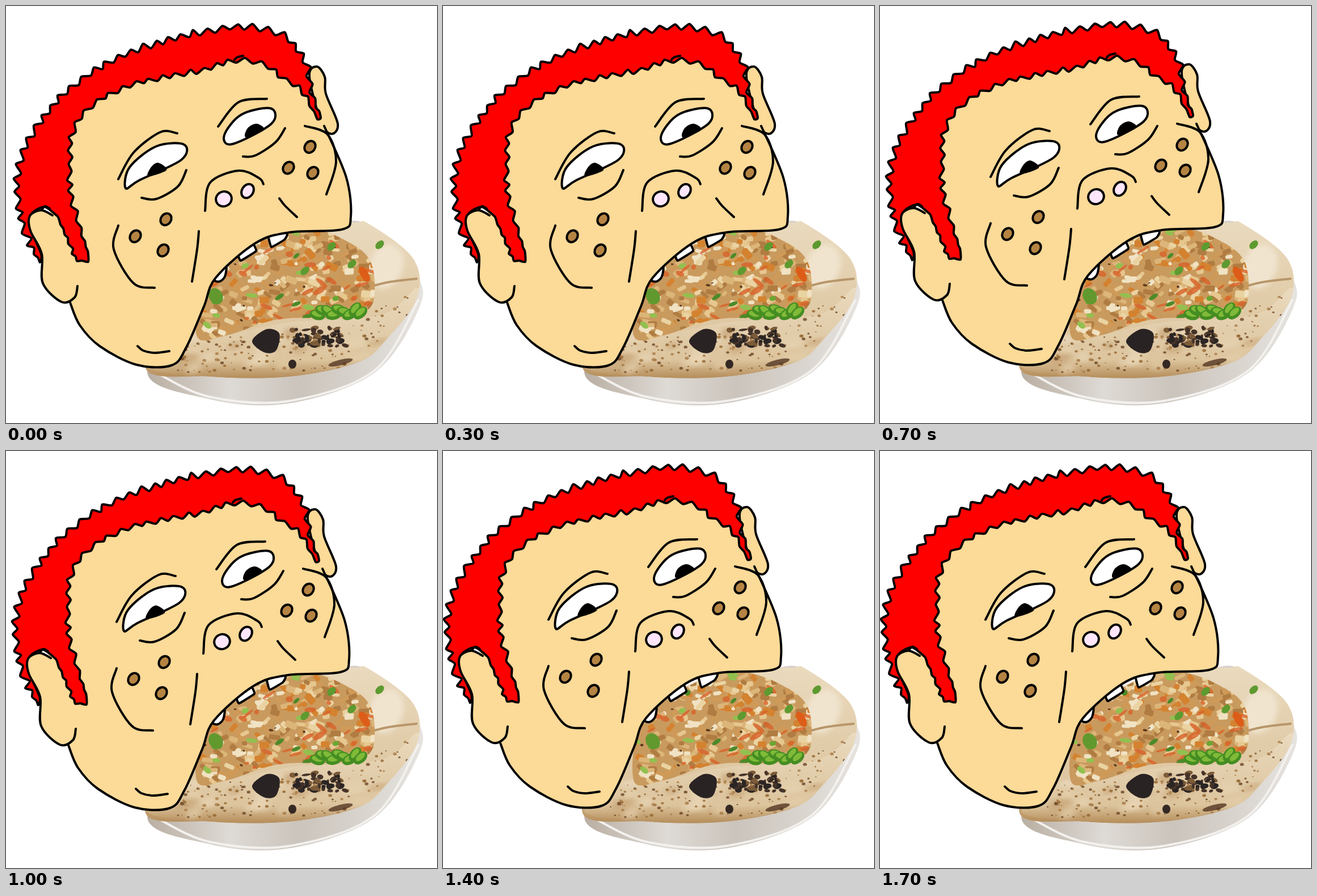
Animation, 760 px wide and 737 px high, one loop 1900 ms. Source, as an HTML page:

```html
<!DOCTYPE html>
<html lang="en">
<head>
<meta charset="utf-8">
<title>Pizza bite</title>
<style>
  html, body { margin: 0; width: 100%; height: 100%; overflow: hidden; background: #fff; }
  svg { display: block; width: 100%; height: 100%; }
</style>
</head>
<body>
<svg id="stage" viewBox="0 0 760 737" stroke-linecap="round" stroke-linejoin="round">
  <defs>
    <linearGradient id="metal">
      <stop offset="0" stop-color="#b9aea2"/>
      <stop offset=".3" stop-color="#dedad5"/>
      <stop offset=".55" stop-color="#cbc4bc"/>
      <stop offset="1" stop-color="#e6e3df"/>
    </linearGradient>
    <linearGradient id="dough" x1="0" y1="0" x2="0" y2="1">
      <stop offset="0" stop-color="#eadabe"/>
      <stop offset=".8" stop-color="#dcc49d"/>
      <stop offset="1" stop-color="#b58d5a"/>
    </linearGradient>
    <filter id="soft" x="-30%" y="-30%" width="160%" height="160%"><feGaussianBlur stdDeviation="5"/></filter>
    <clipPath id="inTop"></clipPath>
    <clipPath id="inCrust"></clipPath>
  </defs>
  <g id="pizza"></g>
  <g id="head"></g>
</svg>
<script>
const SVG = 'http://www.w3.org/2000/svg';
const get = id => document.getElementById(id);
const pizza = get('pizza'), head = get('head');
const INK = { stroke: '#000', 'stroke-width': 4 };
const SKIN = '#fcda98';

function add(parent, tag, attrs) {
  const el = document.createElementNS(SVG, tag);
  for (const key in attrs) el.setAttribute(key, attrs[key]);
  return parent.appendChild(el);
}

let seed = 41;
const rand = (lo = 0, hi = 1) => {
  seed = (seed * 16807) % 2147483647;
  return lo + (hi - lo) * seed / 2147483647;
};
const pick = list => list[Math.floor(rand(0, list.length))];
const repeat = (n, draw) => { for (let i = 0; i < n; i++) draw(i); };

// Smooth path through "x,y x,y ..." points; a lower bend keeps corners sharper.
function spline(text, closed = false, bend = 1 / 6) {
  const p = text.trim().split(/\s+/).map(s => s.split(',').map(Number)), n = p.length;
  const at = i => closed ? p[(i + n) % n] : p[Math.max(0, Math.min(n - 1, i))];
  let d = 'M' + p[0];
  for (let i = 0; i < (closed ? n : n - 1); i++) {
    const [a, b, c, e] = [at(i - 1), at(i), at(i + 1), at(i + 2)];
    const c1 = b.map((v, k) => (v + (c[k] - a[k]) * bend).toFixed(1));
    const c2 = c.map((v, k) => (v - (e[k] - b[k]) * bend).toFixed(1));
    d += `C${c1} ${c2} ${c}`;
  }
  return d + (closed ? 'Z' : '');
}

// Points that zigzag around a smooth guide, calming down near its ends.
function ruffle(guide, step, depth) {
  const path = document.createElementNS(SVG, 'path');
  path.setAttribute('d', spline(guide));
  const len = path.getTotalLength(), out = [];
  let side = 1;
  for (let s = 0; s < len; s += step * rand(.7, 1.3), side = -side) {
    const a = path.getPointAtLength(s), b = path.getPointAtLength(s + 1);
    const off = side * depth * rand(.6, 1.2) * Math.min(1, s / 40, (len - s) / 80);
    const run = Math.hypot(b.x - a.x, b.y - a.y) || 1;
    out.push(`${(a.x + (b.y - a.y) / run * off).toFixed(1)},${(a.y - (b.x - a.x) / run * off).toFixed(1)}`);
  }
  return out.join(' ');
}

const fill = (parent, pts, color, more) =>
  add(parent, 'path', { d: spline(pts, true), fill: color, ...more });
const line = (pts, paint = 'none') =>
  add(head, 'path', { d: spline(pts), fill: paint, ...INK });
const inked = (pts, color, bend) =>
  add(head, 'path', { d: spline(pts, true, bend), fill: color, ...INK });
const oval = (parent, x, y, rx, ry, turn, color, more) =>
  add(parent, 'ellipse', { rx, ry, fill: color, transform: `translate(${x} ${y}) rotate(${turn})`, ...more });

function drawPizza() {
  const blur = { filter: 'url(#soft)' };
  const crust = '245,635 350,470 500,386 612,383 640,385 718,446 725,515 672,588 620,630 500,655 360,655';
  const topping = '336,582 360,470 500,390 622,428 650,490 625,545 480,554 390,582';
  const lip = '250,638 320,585 390,581 500,559 660,546 725,498 724,535 660,608 620,630 500,655 360,655';
  add(get('inTop'), 'path', { d: spline(topping, true) });
  add(get('inCrust'), 'path', { d: spline(crust, true) });

  fill(pizza, '250,640 420,480 588,385 655,400 724,475 728,535 650,648 500,702 360,695', 'url(#metal)');
  line('268,650 360,691 500,698 650,644 727,520').setAttribute('stroke', '#f3f1ee');
  pizza.append(head.lastChild);

  const base = add(pizza, 'g', { 'clip-path': 'url(#inCrust)' });
  fill(base, crust, 'url(#dough)');
  oval(base, 670, 460, 30, 40, 20, '#f0e4cf', blur);

  const food = add(pizza, 'g', { 'clip-path': 'url(#inTop)' });
  fill(food, topping, '#c99a5e');
  const spot = draw => draw(food, rand(340, 645), rand(395, 580));
  const chunks = ['#ead3a2', '#f0e2c3', '#dcb579', '#cf9a58', '#e6c78f', '#d4822f', '#b07c42'];
  repeat(300, () => spot((g, x, y) => add(g, 'rect', {
    width: rand(9, 22), height: rand(6, 13), rx: 3, fill: pick(chunks),
    transform: `translate(${x} ${y}) rotate(${rand(-50, 50)})` })));
  repeat(35, () => spot((g, x, y) => oval(g, x, y, rand(4, 13), rand(2, 5), rand(-40, 40), '#d9622a', { opacity: .8 })));
  repeat(16, () => spot((g, x, y) => oval(g, x, y, rand(2, 5), rand(1, 3), rand(-40, 40), '#5b3a1e')));
  repeat(22, () => spot((g, x, y) => oval(g, x, y, rand(5, 11), rand(3, 5), rand(-45, 40), pick(['#6ba632', '#4c8a29', '#92c04f']))));
  oval(food, 632, 474, 15, 7, 60, '#dd5c18');
  oval(food, 487, 560, 30, 7, -8, '#db651d');
  oval(food, 370, 513, 15, 12, 60, '#62992f');

  fill(base, lip, 'url(#dough)');
  line('646,495 675,488 724,482').setAttribute('stroke', '#b8966a');
  base.append(head.lastChild);
  repeat(30, () => oval(base, rand(300, 680), rand(575, 648), rand(10, 26), rand(4, 9), rand(-20, 5),
    pick(['#efdfc4', '#b98f5d', '#e8d4b1']), { opacity: .5, ...blur }));
  repeat(150, () => {
    const x = rand(290, 715), r = rand(.8, 2.8);
    const y = rand(580, 648) - Math.max(0, x - 570) * .5;
    oval(base, x, y, r * 1.3, r, 0, pick(['#6d4726', '#94662f', '#a97b45']), { opacity: .8 });
  });
  repeat(60, () => oval(base, rand(505, 600), rand(568, 602), rand(2, 8), rand(2, 5), rand(-30, 30),
    pick(['#2b2524', '#453329', '#7b5b38'])));
  fill(base, '434,592 460,571 482,579 476,609 455,612', '#2a2323');
  oval(base, 505, 633, 7, 8, 0, '#342923');
  oval(base, 590, 630, 22, 5, -14, '#553823', { opacity: .8 });

  // Heap of chopped spring onion
  repeat(9, i => {
    const x = 549 + i * 9.5, y = 541 + 5 * Math.cos(i * 2.2), turn = rand(-60, 40);
    oval(pizza, x, y, 14, 9, turn, '#448d22');
    oval(pizza, x, y - 2, 10, 5, turn, '#7fba38');
  });
  [[574, 425], [610, 456], [659, 422], [527, 468]].forEach(([x, y]) => oval(pizza, x, y, 9, 6, -45, '#5d9a30'));
}

function drawHair() {
  const outer = '60,453 40,415 20,350 23,285 42,234 86,172 130,132 205,87 310,54 400,37 455,42 497,57 530,106 538,150 558,205';
  const inner = '549,200 520,147 490,130 455,103 405,96 350,113 290,123 206,145 145,182 117,225 113,280 116,340 146,440';
  const strand = '145,452 122,448 118,434 88,366';
  const behindEar = '68,355 46,366 41,388 62,438';
  inked([ruffle(outer, 12, 5.5), ruffle(inner, 12, 4), ruffle(strand, 9, 3), behindEar].join(' '), '#f00', .12);
  line('403,95 407,91 418,88');
}

function drawHead() {
  inked('366,482 376,460 388,458 386,478 376,487', '#fff');
  inked('410,440 434,418 441,433 414,450', '#fff', .05);
  inked('462,402 490,396 496,404 491,413 468,426', '#fff', .05);
  inked('535,125 548,107 562,125 564,155 585,208 574,226 556,207', SKIN);

  const jaw = '113,524 130,564 165,601 230,634 292,635 318,603 349,531 370,480 440,419 500,400 592,395 608,372 600,303 561,212';
  add(head, 'path', { fill: SKIN, d: spline(jaw) + 'L552,190 480,85 410,70 200,125 90,230 75,400Z' });
  line(jaw);
  drawHair();
  line('82,370 62,361 42,371 43,397 63,438 65,490 98,523 121,515 126,495', SKIN);
  line('62,361 69,354 77,358');

  // Left eye, then right eye
  inked('211,322 218,285 265,248 314,245 309,272 235,308', '#fff');
  fill(head, '251,301 255,286 268,277 283,290', '#000');
  line('198,306 225,259 272,223 302,225');
  line('239,339 265,341 303,319 318,290');
  inked('385,228 415,192 467,181 468,208 399,244', '#fff');
  fill(head, '423,232 426,216 442,208 455,219', '#000');
  line('374,213 410,170 460,164');
  line('418,266 440,264 475,241 492,216');

  line('351,362 360,312 410,291 446,304 454,315');
  oval(head, 384, 341, 14, 13, -25, '#ffe6fa', INK);
  oval(head, 426, 327, 10, 13, 32, '#ffe6fa', INK);
  [[228, 407], [282, 377], [277, 432], [498, 286], [536, 249], [541, 295]]
    .forEach(([x, y]) => oval(head, x, y, 9, 11, 35, '#b58443', INK));

  line('198,388 190,430 225,490 262,498');
  line('340,398 337,430 328,487');
  line('482,340 492,353 513,373');
  line('527,212 567,227 582,275 565,333');
  line('232,601 242,609 262,613 288,610');
}

// Each pose: end time in ms, then the head's offset.
const LOOP = 1900;
const poses = [[500, 0, 0], [700, -3, 10], [1200, -3, -4], [1400, 0, 11], [LOOP, -12, -8]];

function render(ms) {
  const t = ms % LOOP;
  const [, x, y] = poses.find(p => t < p[0]);
  head.setAttribute('transform', `translate(${x} ${y})`);
}

drawPizza();
drawHead();
const start = performance.now();
function tick() {
  render(performance.now() - start);
  requestAnimationFrame(tick);
}
render(0);
requestAnimationFrame(tick);
</script>
</body>
</html>
```
